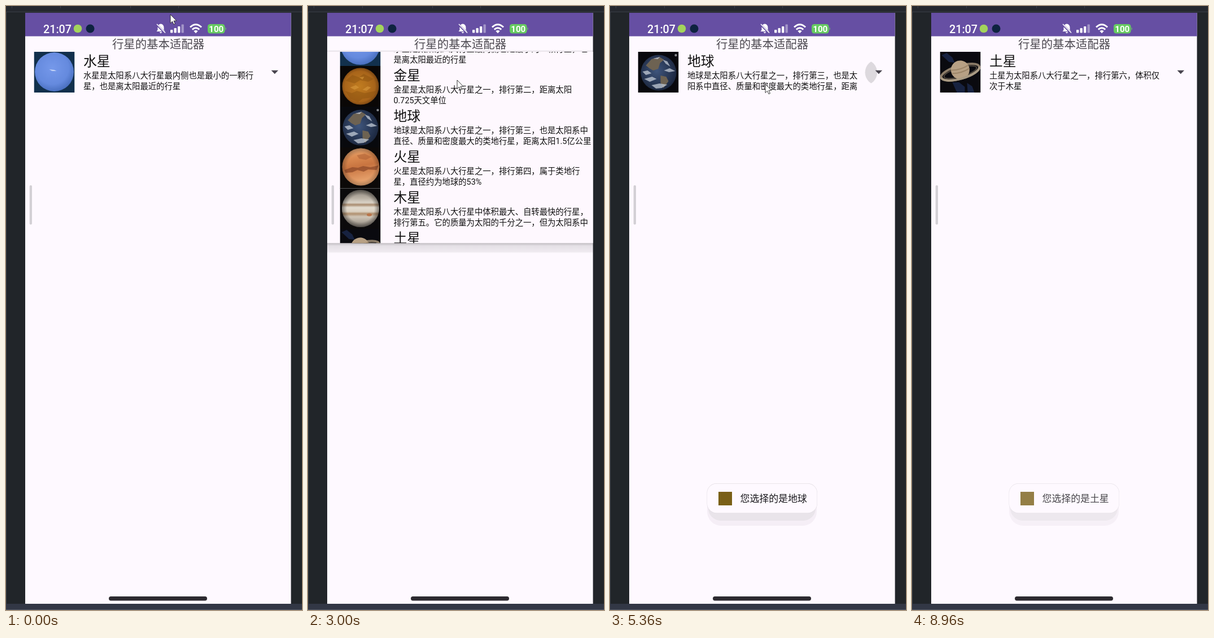
Write an HTML page that moves like this. It is 524 px wide and 1068 px high and loops after 8.98 s.

```html
<!DOCTYPE html>
<html lang="zh-CN">
<head>
<meta charset="utf-8">
<title>行星</title>
<style>
html, body { margin: 0; height: 100%; overflow: hidden; background: #212529; }
svg { display: block; }
text { font-family: Roboto, "Noto Sans CJK SC", "Noto Sans CJK", sans-serif; white-space: pre; }
.name { font-size: 23.8px; fill: #111; }
.desc { font-size: 14.35px; fill: #111; }
</style>
</head>
<body>
<svg width="524" height="1068" viewBox="0 0 524 1068">
  <defs>
    <radialGradient id="blue" cx=".45" cy=".4" r=".6"><stop stop-color="#7598ea"/><stop offset=".7" stop-color="#658ade"/><stop offset="1" stop-color="#4a70c0"/></radialGradient>
    <radialGradient id="gold" cx=".48" cy=".5" r=".55"><stop stop-color="#c07c20"/><stop offset=".75" stop-color="#a8641a"/><stop offset="1" stop-color="#6a3c10"/></radialGradient>
    <radialGradient id="sea" cx=".45" cy=".45" r=".56"><stop stop-color="#3f557c"/><stop offset="1" stop-color="#1c2840"/></radialGradient>
    <linearGradient id="rust" x2=".2" y2="1"><stop stop-color="#e6ae7e"/><stop offset=".3" stop-color="#db8a50"/><stop offset=".55" stop-color="#c87440"/><stop offset="1" stop-color="#eba873"/></linearGradient>
    <linearGradient id="bands" x2="0" y2="1"><stop stop-color="#8d867d"/><stop offset=".22" stop-color="#b9b0a4"/><stop offset=".34" stop-color="#d9d2c6"/><stop offset=".4" stop-color="#a98c70"/><stop offset=".47" stop-color="#e2dbcf"/><stop offset=".58" stop-color="#dcd2c2"/><stop offset=".64" stop-color="#b0906f"/><stop offset=".72" stop-color="#cfc5b6"/><stop offset="1" stop-color="#8d867d"/></linearGradient>
    <radialGradient id="shade" r=".52"><stop offset=".7" stop-opacity="0"/><stop offset="1" stop-opacity=".5"/></radialGradient>
    <linearGradient id="drop" x2="0" y2="1"><stop stop-color="#000" stop-opacity=".24"/><stop offset=".28" stop-opacity=".1"/><stop offset=".85" stop-opacity=".06"/><stop offset="1" stop-opacity="0"/></linearGradient>
    <clipPath id="tile"><path d="M0 0H72V72H0Z"/></clipPath>
    <clipPath id="spot"><circle cx="474" cy="117.5" r="22.5"/></clipPath>

    <symbol id="p0" viewBox="0 0 72 72">
      <path fill="#12304c" d="M0 0H72V72H0Z"/>
      <circle cx="36" cy="35.5" r="34.5" fill="url(#blue)"/>
      <path d="M27 31l9 1 4 2-8 0Z" fill="#c3d3f6"/>
    </symbol>
    <symbol id="p1" viewBox="0 0 72 72">
      <path fill="#0a0706" d="M0 0H72V72H0Z"/>
      <circle cx="36.5" cy="36" r="32.5" fill="url(#gold)"/>
      <path fill="#87500f" opacity=".45" d="M10 26l12-10 12 4 8-6 18 9-10 5-14-3-10 6ZM9 44l12 4 9-4 14 4 20-4-8 12-16 2-8 6-14-6Z"/>
      <path fill="#d99a3c" opacity=".6" d="M18 38l10-4 6 4-8 4ZM40 42l9-6 6 2-8 6ZM34 20l9-1-3 5Z"/>
    </symbol>
    <symbol id="p2" viewBox="0 0 72 72">
      <path fill="#08090d" d="M0 0H72V72H0Z"/>
      <circle cx="36.5" cy="37" r="31.5" fill="url(#sea)"/>
      <path fill="#6d6252" d="M14 24l10-11 14-4 8 5-7 6-3 10-9 3-7-4ZM40 42l10 2 4 8-9 12-5-9Z"/>
      <path fill="#b9c2cf" opacity=".8" d="M8 35l9-2 7 5-10 3ZM11 48l14-4 8 4-12 5ZM24 59l14-3 14 2-10 6-10 1ZM44 14l8 3 5 9-8-5ZM46 33l10-4 10 5-11 2ZM27 12l12-3-4 4Z"/>
      <circle cx="67" cy="6" r="2.2" fill="#85878b"/>
    </symbol>
    <symbol id="p3" viewBox="0 0 72 72">
      <path fill="#0c0908" d="M0 0H72V72H0Z"/>
      <circle cx="37" cy="34.500" r="33" fill="url(#rust)"/>
      <path fill="#8a4727" opacity=".7" d="M8 40l14-5 10 1 9-3 13 2 14-3-3 8-15-1-8 4-11-3-9 4-12 1Z"/>
      <path fill="#a85c32" opacity=".5" d="M30 14l14-3 12 6-10 5-12-2Z"/>
      <circle cx="37" cy="34.500" r="33" fill="url(#shade)" opacity=".6"/>
    </symbol>
    <symbol id="p4" viewBox="0 0 72 72">
      <path fill="#0b0a0b" d="M0 0H72V72H0Z"/>
      <path fill="#555" d="M0 0H72V.8H0Z"/>
      <circle cx="36.500" cy="36" r="33" fill="url(#bands)"/>
      <ellipse cx="52" cy="47" rx="4.500" ry="2.700" fill="#b9754a"/>
      <circle cx="36.500" cy="36" r="33" fill="url(#shade)"/>
    </symbol>
    <symbol id="p5" viewBox="0 0 72 72">
      <g clip-path="url(#tile)">
        <path fill="#0a0a0f" d="M0 0H72V72H0Z"/>
        <path fill="#1b2a50" opacity=".75" d="M3 6l9-4 10 8 4 9-10-1ZM22 54l12 0 10 8 0 10H30ZM48 55l9 6 4 11H49Z"/>
        <g transform="rotate(-16 36 36)" fill="none">
          <ellipse cx="36" cy="36" rx="35" ry="11.500" stroke="#8c7c68" stroke-width="4"/>
          <ellipse cx="36" cy="36" rx="30" ry="8" stroke="#4c443b" stroke-width="2"/>
          <circle cx="37" cy="32" r="16.500" fill="#b7a084"/>
          <path d="M21 28q16 5 32 0M21 34q16 5 32 0" stroke="#9c8568" stroke-width="2"/>
          <path d="M1 36a35 11.500 0 0 0 70 0" stroke="#a99a83" stroke-width="4"/>
        </g>
      </g>
    </symbol>
  </defs>

  <path fill="#212529" d="M0 0H524V1068H0Z"/>
  <path fill="#25282e" d="M0 0H524V10H0Z"/>
  <path fill="#3a3e46" d="M0 10H524V11H0ZM10 0h1v4h-1ZM96 0h1v4h-1ZM220 0h1v4h-1ZM305 0h1v4h-1ZM0 11H1V1057H0Z"/>
  <path fill="#323745" d="M0 1057H524V1067H0Z"/>
  <path fill="#555a66" d="M0 1067H524V1068H0Z"/>
  <path fill="#fef9ff" d="M34 12H504.500V1057H34Z"/>
  <path fill="#664fa3" d="M34 12H504.500V53.500H34Z"/>

  <g fill="#fff">
    <text x="66" y="48" font-size="19.700" font-weight="500">21:07</text>
    <circle cx="127" cy="40" r="7.300" fill="#a3d45c"/>
    <circle cx="149" cy="40" r="7.500" fill="#0e2340"/>
    <path d="M274 31.500q5.500 1 5.500 7v4l2 2.500h-15l2-2.500v-4q0-6 5.500-7ZM271.500 46h5l-2.500 2.500Z"/>
    <path d="M266.500 32.500l15 15.500" stroke="#664fa3" stroke-width="3.500"/>
    <path d="M267 32l15 15.500" stroke="#fff" stroke-width="1.500"/>
    <rect x="291" y="42" width="4.300" height="5.500" rx="1"/>
    <rect x="297.500" y="39" width="4.300" height="8.500" rx="1"/>
    <rect x="304" y="36" width="4.300" height="11.500" rx="1"/>
    <rect x="310.500" y="32.500" width="4.300" height="15" rx="1" opacity=".4"/>
    <path d="M326 37.500q10-9.500 20 0M329.800 41.700q6.200-5.800 12.400 0" fill="none" stroke="#fff" stroke-width="3"/>
    <path d="M332.300 44.300q3.700-3 7.400 0l-3.700 3.900Z"/>
    <rect x="357" y="32" width="30.500" height="16.500" rx="4.500" fill="#66cb61"/>
    <path d="M388.500 37.500q2.500 2.700 0 5.500Z" fill="#66cb61"/>
    <text x="372.200" y="45.500" font-size="15" font-weight="700" text-anchor="middle">100</text>
  </g>
  <text x="269.500" y="74.800" font-size="20.400" fill="#4c4950" text-anchor="middle">行星的基本适配器</text>

  <g id="spinner"></g>
  <g clip-path="url(#spot)"><circle id="ripple" cy="117.500" r="22.500"/></g>
  <path fill="#49454f" d="M469.500 113.800H482L475.700 120.200Z"/>

  <g id="popup">
    <path fill="#000" opacity=".07" d="M34 78.500H504.500V81H34Z"/>
    <svg id="panel" x="34" y="81" width="470.500">
      <path fill="#fef8fe" d="M0 0H471V432H0Z"/>
      <g id="list"></g>
    </svg>
    <rect id="under" x="34" width="470.500" height="18" fill="url(#drop)"/>
  </g>

  <g id="toast">
    <rect x="172" y="858" width="194" height="61" rx="25" fill="#f5eef6"/>
    <rect x="174" y="856" width="190" height="54" rx="22" fill="#e9e4ea"/>
    <rect x="171.500" y="844" width="195.500" height="53" rx="17" fill="#e2dde3"/>
    <rect x="172" y="844.700" width="194.500" height="51.500" rx="16.500" fill="#fef9ff"/>
    <rect x="192" y="859" width="24" height="24" fill="#7a6017"/>
    <text id="note" x="230.500" y="877.300" font-size="16.900" fill="#1c1b1f"></text>
  </g>

  <rect x="41.700" y="317" width="4.300" height="69.500" rx="2" fill="#d3d0d5"/>
  <rect x="182" y="1044" width="174" height="7.500" rx="3.700" fill="#2d2a30"/>
  <path id="cursor" d="M0 0V15.500L3.500 12.200 6 17.600 8.400 16.500 6 11.200H10.800Z" fill="#fff" stroke="#222" stroke-width=".9"/>
</svg>

<script>
const LOOP = 8980;
const $ = id => document.getElementById(id);
const clamp = v => Math.max(0, Math.min(1, v));

// name, description, characters on the first line of a list row
const planets = [
  ['水星', '水星是太阳系八大行星最内侧也是最小的一颗行星，也是离太阳最近的行星', 24],
  ['金星', '金星是太阳系八大行星之一，排行第二，距离太阳0.725天文单位', 22],
  ['地球', '地球是太阳系八大行星之一，排行第三，也是太阳系中直径、质量和密度最大的类地行星，距离太阳1.5亿公里', 24],
  ['火星', '火星是太阳系八大行星之一，排行第四，属于类地行星，直径约为地球的53%', 23],
  ['木星', '木星是太阳系八大行星中体积最大、自转最快的行星，排行第五。它的质量为太阳的千分之一，但为太阳系中', 24],
  ['土星', '土星为太阳系八大行星之一，排行第六，体积仅次于木星', 24]
];

// time of the opening click, planet picked, time of the pick
const rounds = [[850, 0, 2450], [2760, 1, 3750], [4330, 2, 4950], [5330, 3, 6020], [6260, 5, 7700]];

const toasts = rounds.slice(1).map(([, planet, pick], i, all) =>
  ({ planet, start: pick + 280, end: i + 1 < all.length ? all[i + 1][2] + 280 : 9120 }));

// time, x, y
const path = [
  [120, 291, 15], [660, 270, 126], [2190, 267, 126], [2900, 264, 131], [3250, 264, 131],
  [3650, 268, 185], [3800, 268, 185], [4200, 261, 130], [4450, 261, 130], [4850, 270, 262],
  [5000, 270, 262], [5280, 275, 138], [5450, 275, 138], [5900, 280, 335], [6050, 280, 335],
  [6240, 282, 142], [6450, 282, 142], [7200, 267, 457], [7780, 267, 457], [8450, 330, 1080]
];

function row(i, x, y, textX, cut, rest) {
  const [name, desc] = planets[i];
  return `<use href="#p${i}" x="${x}" y="${y}" width="72" height="72"/>
    <text class="name" x="${textX}" y="${y + 25}">${name}</text>
    <text class="desc" x="${textX}" y="${y + 47.3}">${desc.slice(0, cut)}</text>
    <text class="desc" x="${textX}" y="${y + 66.2}">${desc.slice(cut, cut + rest)}</text>`;
}

$('list').innerHTML = planets.map((p, i) => row(i, 22.5, i * 72, 117.5, p[2], 40)).join('');

let shown = -1;
function select(i) {
  if (i === shown) return;
  shown = i;
  $('spinner').innerHTML = row(i, 49.5, 81, 137, 21, 21);
}

function drawPopup(t) {
  const [click, , pick] = rounds.filter(r => t >= r[0]).pop() || [1e5, 0, 1e5];
  const age = t - click - 80;
  const open = 1 - (1 - clamp(age / 250) ** 1.5) ** 2.1;
  $('popup').setAttribute('opacity', Math.min(clamp((age - 25) / 100), clamp((pick + 200 - t) / 200)));
  $('panel').setAttribute('height', 432 * open);
  $('list').setAttribute('transform', `translate(0 ${-216 * (1 - open)})`);
  $('under').setAttribute('y', 81 + 432 * open);

  const grow = clamp((t - click) / 100);
  $('ripple').setAttribute('cx', 440 + 34 * grow);
  $('ripple').setAttribute('opacity', grow ? 0.13 * clamp((click + 450 - t) / 200) : 0);
}

function drawToast(t) {
  const toast = toasts.find(s => t >= s.start && t < s.end);
  $('toast').setAttribute('opacity', toast ? Math.min(clamp((t - toast.start) / 120), clamp((toast.end - t) / 200)) : 0);
  if (toast) $('note').textContent = '您选择的是' + planets[toast.planet][0];
}

function drawCursor(t) {
  const last = path.length - 1;
  const n = path.findIndex(k => t < k[0]);
  const b = path[n < 0 ? last : n];
  const a = n > 0 ? path[n - 1] : b;
  const u = a === b ? 0 : (t - a[0]) / (b[0] - a[0]);
  const e = u * u * (3 - 2 * u);
  $('cursor').setAttribute('transform', `translate(${a[1] + (b[1] - a[1]) * e} ${a[2] + (b[2] - a[2]) * e})`);
}

const begin = performance.now();
function draw() {
  const t = (performance.now() - begin) % LOOP;
  const picked = rounds.filter(r => t >= r[2]).pop();
  select(picked ? picked[1] : 0);
  drawPopup(t);
  drawToast(t);
  drawCursor(t);
  requestAnimationFrame(draw);
}
draw();
</script>
</body>
</html>
```
